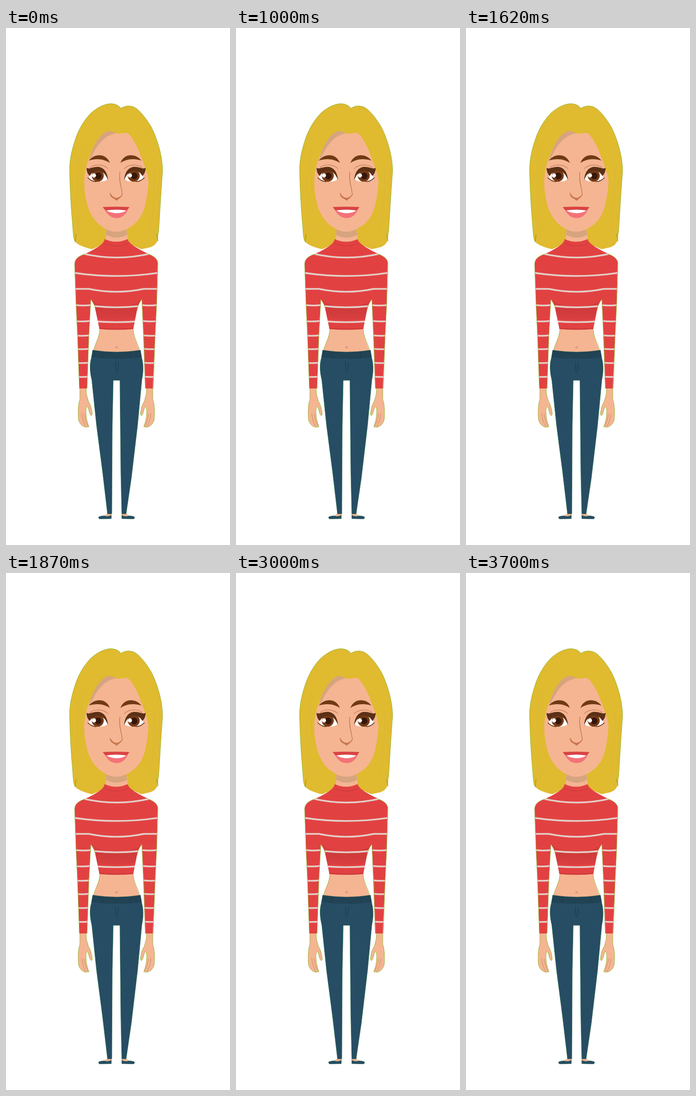
An HTML page that plays this animation: 470 by 1080 pixels, repeating every 3.8 s.

```html
<!DOCTYPE html>
<html lang="en">
<head>
<meta charset="utf-8">
<title>Standing woman</title>
<style>
  html, body { margin: 0; width: 100%; height: 100%; overflow: hidden; background: #fff; }
  svg { display: block; width: 470px; height: 1080px; }
  .eye, .lid { transform-box: view-box; transform-origin: 0 317px; }
  .lid { opacity: 0; }
  .line { fill: none; stroke-linecap: round; }
  .edge { fill: none; stroke: #8cb52c; stroke-width: .9; }
</style>
</head>
<body>
<script>
const SKIN = '#f5b592', SHADE = '#d6a57f', HAIR = '#e0ba2f', RED = '#e24142',
      DENIM = '#264d63', BROWN = '#5b3016', CREASE = '#cf8a68', STRIPE = '#e3cfc7';

const fill = (d, color, more = '') => `<path d="${d}" fill="${color}" ${more}/>`;
const line = (d, color, width, more = '') =>
  `<path class="line" d="${d}" stroke="${color}" stroke-width="${width}" ${more}/>`;
const edge = d => `<path class="edge" d="${d}"/>`;
const flip = (art, sum) => `<g transform="matrix(-1 0 0 1 ${sum} 0)">${art}</g>`;
const pair = (art, sum) => art + flip(art, sum);

const hairLeft = `M241 168C236 160 226 158 219 158C205 159 190 167 178 178C165 191 153 210 146 231
  C138 254 133.5 275 133.5 295C134 330 136 370 140 415C141 432 142 444 146 447`;
const hairRight = `M241 168C247 163 258 161 268 165C280 170 295 190 305 207C318 232 329 270 328.5 300
  C325 345 323 385 320 428`;
const hair = fill(`${hairLeft}C149 452 165 459 181 462L232 440Z`, HAIR)
  + fill(`${hairRight}C319 441 318 447 315 449C311 457 300 459 284 462L232 440Z`, HAIR)
  + fill('M240 167L242 167L242 445L232 445L228 300Z', HAIR)
  + line('M152 270C148 320 149 380 153 430M160 250C156 290 158 320 160 345', '#d5b345', 1, 'opacity=".6"')
  + line('M312 290C313 340 308 390 303 430M322 300L318 405', '#d5b345', 1, 'opacity=".6"')
  + line('M145 447L147 431M316 430L319 445', '#6d9a2b', 1)
  + edge(hairLeft) + edge(hairRight);

const neck = fill('M211 415L209 448Q232 456 256 448L252 415Z', SKIN)
  + fill('M211 419L210 432Q232 444 254 432L252 419Z', SHADE);

const face = fill(`M231 220C238 222 245 219 252 219C259 220 266 230 277 252C289 282 298 305 299 320
  C298 340 295 358 290 377C283 399 270 412 251 421C238 427 225 427 212 421C195 413 182 400 173 377
  C165 352 162 325 166 300C172 270 186 240 204 222C212 214 222 216 231 220Z`, SKIN)
  + fill('M174 277C180 250 196 222 212 216C220 214 226 217 231 220C206 224 191 245 180 268Z', SHADE);

const brow = fill('M174 277C182 266 197 263 207 268.5C213 272 216 277 218 282C208 275 192 271 174 277Z', '#703a14');

const lids = line('M177 291C187 284 204 284 214 294', CREASE, 1.6);
const eyeWhite = fill('M173 313C177 303 184 297 193 297C204 298 211 306 213 316C206 323 183 323 173 313Z', '#fff');
const lash = fill(`M169 292C174 296 181 290 193 290C205 291 213 301 214 318C210 307 204 299 194 298
  C185 298 180 302 176 309C172 306 169 300 169 292Z`, BROWN)
  + line('M172 313C177 318 183 321 189 321', BROWN, 1.7);
const iris = (x, shine) => `<circle cx="${x}" cy="308.5" r="12.6" fill="#743814"/>
  <circle cx="${x + 1}" cy="309" r="7" fill="#35170b"/><circle cx="${shine}" cy="308" r="4.4" fill="#fff"/>`;

const closedEye = fill('M177 313C179 301 189 300 197 301C206 303 211 310 213 316C199 321 184 319 177 313Z', '#d9a57c')
  + line('M177 296C187 287 204 288 213 296', CREASE, 1.6)
  + fill('M169 308C178 319 198 322 214 316C203 325 181 326 174 317C171 315 170 312 169 308Z', BROWN);

const nose = line('M239 301C236 320 243 333 244 348', '#c77b59', 1.5)
  + fill('M218 343C222 352 227 354 232 355C238 354 242 350 245 346C244 353 237 356 232 361C227 355 217 356 218 343Z', '#c8754f');

const mouth = fill('M205 375C212 391 221 397 232 397C243 397 253 390 257 375Z', '#f47278')
  + fill('M210 380C217 378 246 378 253 380C246 389 219 389 210 380Z', '#fff')
  + fill('M203 374C222 373 241 373 259 374C256 378 254 381 252 381Q232 378 210 381C207 380 205 377 203 374Z', '#d94344');

const shirtShape = `M207 441C205 452 190 460 166 472C150 477 144 484 144 494L146 545L147 578L150 640L154 753
  L170 753L174 640L178 567C184 575 187 582 188 590L196 629Q232 632 267 629L275 588C277 580 280 572 285 567
  L288 640L292 753L308 753L312 660L316 580L318 495C320 485 313 478 299 472C275 460 259 452 255 441Q231 452 207 441Z`;
const armStripes = [612, 642, 670, 699, 728]
  .map(y => line(`M140 ${y}Q160 ${y + 2} 176 ${y}`, STRIPE, 3.4)).join('');
const shirt = fill(shirtShape, RED)
  + `<g clip-path="url(#shirt)">`
  + fill('M178 566C200 588 264 588 285 566C278 578 275 590 273 606Q232 613 191 606C188 590 186 578 178 566Z', 'url(#bust)')
  + line('M192 627Q232 631 271 627', '#c9393a', 2)
  + line('M160 471Q232 488 304 471', STRIPE, 3.6)
  + line('M140 511Q232 525 322 511', STRIPE, 3.6)
  + line('M140 545L174 545Q232 557 289 545L322 545', STRIPE, 3.6)
  + line('M186 581Q232 586 278 581', STRIPE, 3.4)
  + line('M190 613Q232 616 273 613', STRIPE, 3.4)
  + pair(line('M140 578Q160 581 177 579', STRIPE, 3.4) + armStripes, 463)
  + line('M207 450Q231 461 256 450', '#c9393a', 1.2)
  + '</g>'
  + pair(edge('M166 472C150 477 144 484 144 494L147 578L150 640L154 753M170 753L174 640L178 567C184 575 187 582 188 590'), 463);

const belly = fill('M197 626C196 648 186 660 183 678L281 678C277 660 267 648 267 626Z', SKIN)
  + pair(edge('M197 630C196 648 186 660 183 676'), 464)
  + '<circle cx="232" cy="667" r="2.6" fill="#df9b83"/>';

const jeans = fill(`M182 673Q232 681 282 673L285 690C289 705 288 720 285 735L276 830L263 940L252 1015L243 1015
  L241 930L239 736L225 736L223 830L222 1015L213 1015L203 930L190 830L180 735C175 715 176 700 179 690Z`,
  DENIM, 'stroke="#2b6d50" stroke-width=".8"')
  + fill('M182 673Q232 681 282 673L284 686Q232 692 180 686Z', '#214354')
  + line('M180 687Q232 693 284 687M230 697L230 716M236 698C236 711 234 718 231 720M201 677L202 688M262 677L261 688', '#1c3c4d', 1.2);

const shoe = fill('M207 1018L213 1014L222 1014L221 1022L207 1022Z', SKIN)
  + fill('M195 1021Q200 1019 206 1019Q213 1022 221 1018L221 1025L196 1025.5Q193 1023 195 1021Z', DENIM,
    'stroke="#1f5a4c" stroke-width=".7"');

const handShape = `M155 753L155 776C151 786 151 803 152 818C154 826 159 832 167 834L174 833
  C171 825 168 815 168 805C167 797 169 790 171 791C175 798 174 806 179 810L181 807
  C180 796 178 788 173 780L169 766L168 753`;
const hand = fill(handShape, SKIN) + edge(handShape)
  + line('M159 805Q160 820 167 832M164 806Q166 821 172 831', '#cf8f6e', 1.1);

document.body.innerHTML = `<svg viewBox="0 0 470 1080">
  <defs>
    <clipPath id="shirt"><path d="${shirtShape}"/></clipPath>
    <linearGradient id="bust" x2="0" y2="1">
      <stop stop-color="#c9393a" stop-opacity=".3"/><stop offset=".5" stop-color="#c9393a" stop-opacity=".75"/>
      <stop offset="1" stop-color="#c9393a" stop-opacity=".35"/>
    </linearGradient>
  </defs>
  ${hair}${neck}${belly}${pair(shoe, 464)}${jeans}${pair(hand, 463)}
  <g class="shirt">${shirt}</g>
  ${face}
  <g class="eye">${pair(eyeWhite, 462)}${iris(192.5, 184.5)}${iris(268, 260)}${pair(lash, 462)}${pair(lids, 462)}</g>
  <g class="lid">${pair(closedEye, 462)}</g>
  <g class="soft">${nose}${mouth}</g>
  <g class="brow">${pair(brow, 458)}</g>
</svg>`;

const LOOP = 3800;
const play = (name, prop, steps, easing = 'linear') => {
  const frames = steps.map(([ms, value]) => ({ offset: ms / LOOP, [prop]: value, easing }));
  document.querySelectorAll('.' + name).forEach(el =>
    el.animate(frames, { duration: LOOP, iterations: Infinity }));
};

// One blink: close, hold, open.
const blink = (rest, shut) => [[0, rest], [1290, rest], [1380, shut], [1450, shut], [1560, rest], [LOOP, rest]];
const hold = (rest, shut) => [[0, rest], [1370, shut], [1460, rest], [LOOP, rest]];
const shift = y => `translateY(${y}px)`;

play('eye', 'transform', blink('scaleY(1)', 'scaleY(.25)'));
play('eye', 'opacity', hold(1, 0), 'step-end');
play('lid', 'opacity', hold(0, 1), 'step-end');
play('brow', 'transform', blink(shift(0), shift(7.5)));
play('soft', 'transform', blink(shift(0), shift(1.3)));
play('shirt', 'transform', blink(shift(0), shift(.8)));
play('edge', 'stroke', hold('#8cb52c', '#35b52a'), 'step-end');
play('edge', 'strokeWidth', hold('.9px', '1.3px'), 'step-end');
</script>
</body>
</html>
```
